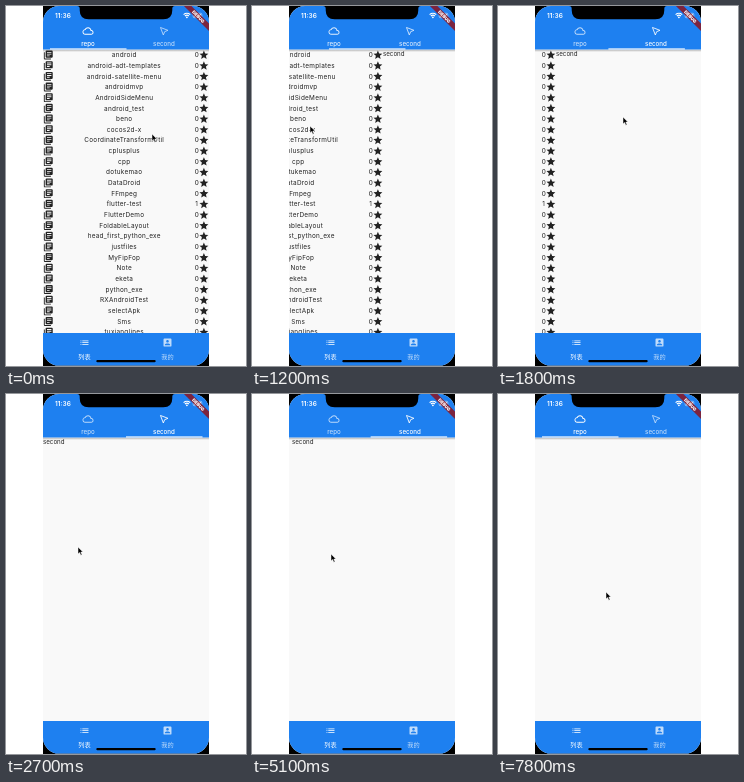
Write an HTML page that moves like this. It is 240 by 360 pixels and loops after 8000 ms.

```html
<!DOCTYPE html>
<html lang="en">
<head>
<meta charset="utf-8">
<title>Tab swipe</title>
<style>
  html, body { margin: 0; width: 100%; height: 100%; overflow: hidden; background: #fff; }
  svg { display: block; width: 100vw; height: 100vh; }
  text { font-family: Inter, Roboto, "Noto Sans CJK SC", "Noto Sans CJK", sans-serif; }
  .row text { font-size: 6.4px; letter-spacing: .27px; fill: #222; }
  .tab text { font-size: 6.2px; font-weight: 500; }
  .nav text { font: 500 6.2px "Noto Sans CJK SC", "Noto Sans CJK", sans-serif; }
  .mid { text-anchor: middle; }
  .white { fill: #fff; }
</style>
</head>
<body>
<svg viewBox="0 0 240 360">
  <defs>
    <clipPath id="screen"><rect x="37" width="166" height="359.6" rx="16"/></clipPath>
    <clipPath id="body"><rect x="37" y="43.5" width="166" height="283.5"/></clipPath>
    <linearGradient id="shade" x2="0" y2="1">
      <stop stop-color="#000" stop-opacity=".3"/>
      <stop offset="1" stop-color="#000" stop-opacity="0"/>
    </linearGradient>
    <path id="books" d="M4 6H2v14c0 1.1.9 2 2 2h14v-2H4V6zm16-4H8c-1.1 0-2 .9-2 2v12c0 1.1.9 2 2 2h12c1.1 0 2-.9 2-2V4c0-1.1-.9-2-2-2zm-1 9H9V9h10v2zm-4 4H9v-2h6v2zm4-8H9V5h10v2z"/>
    <path id="star" d="M12 17.27L18.18 21l-1.64-7.03L22 9.24l-7.19-.61L12 2 9.19 8.63 2 9.24l5.46 4.73L5.82 21z"/>
    <path id="cloud" d="M19.35 10.04C18.67 6.59 15.64 4 12 4 9.11 4 6.6 5.64 5.35 8.04 2.34 8.36 0 10.91 0 14c0 3.31 2.69 6 6 6h13c2.76 0 5-2.24 5-5 0-2.64-2.05-4.78-4.65-4.96zM19 18H6c-2.21 0-4-1.79-4-4s1.79-4 4-4h.71C7.37 7.69 9.48 6 12 6c3.04 0 5.5 2.46 5.5 5.5v.5H19c1.66 0 3 1.34 3 3s-1.34 3-3 3z"/>
    <path id="plane" d="M4 4L21 10.5 13.5 13.5 10.5 21z" fill="none" stroke="#fff" stroke-width="2"/>
    <path id="list" d="M3 13h2v-2H3v2zm0 4h2v-2H3v2zm0-8h2V7H3v2zm4 4h14v-2H7v2zm0 4h14v-2H7v2zM7 7v2h14V7H7z"/>
    <path id="account" d="M3 5v14c0 1.1.89 2 2 2h14c1.1 0 2-.9 2-2V5c0-1.1-.9-2-2-2H5c-1.11 0-2 .9-2 2zm12 4c0 1.66-1.34 3-3 3s-3-1.34-3-3 1.34-3 3-3 3 1.34 3 3zm-9 8c0-2 4-3.1 6-3.1s6 1.1 6 3.1v1H6v-1z"/>
  </defs>

  <rect x="37" width="166" height="360"/>
  <g clip-path="url(#screen)">
    <rect x="37" width="166" height="360" fill="#f9f9f9"/>
    <g clip-path="url(#body)">
      <g id="pages">
        <g id="rows"></g>
        <text x="203" y="49.8" font-size="6.2" fill="#222">second</text>
      </g>
      <rect x="37" y="43.5" width="166" height="2.5" fill="url(#shade)"/>
    </g>

    <rect x="37" width="166" height="43.5" fill="#1e80f0"/>
    <g class="tab white" id="tab0"></g>
    <g class="tab white" id="tab1"></g>
    <rect id="line" x="44" y="42.4" width="76.5" height="1.1" fill="#fff"/>

    <text class="white" x="49" y="11.9" font-size="6.5" font-weight="600">11:36</text>
    <g fill="none" stroke="#fff">
      <path d="M177.6 8.7a4.9 4.9 0 0 1 6.6 0M178.9 10a3 3 0 0 1 4 0" stroke-width="1.1"/>
      <rect x="187.2" y="7.3" width="8.6" height="4.4" rx="1.2" stroke-width=".5"/>
    </g>
    <circle class="white" cx="180.9" cy="11.3" r=".9"/>
    <rect class="white" x="188" y="8.1" width="7" height="2.8" rx=".6"/>
    <g transform="translate(203 0) rotate(45)">
      <rect x="-18" y="12.4" width="36" height="5.3" fill="#851d30" fill-opacity=".92"/>
      <text class="mid white" y="16.7" font-size="4.5" font-weight="900">DEBUG</text>
    </g>

    <g class="nav white">
      <rect x="37" y="327" width="166" height="33" fill="#1e80f0"/>
      <g id="nav0"></g>
      <g id="nav1" opacity=".72"></g>
    </g>
    <rect x="90.3" y="354" width="59.4" height="2.3" rx="1.15"/>
  </g>
  <path d="M71 0q2.7 0 2.7 2.7v1.6q0 9 9 9h74.6q9 0 9-9v-1.6q0-2.7 2.7-2.7z"/>
  <path id="cursor" d="M0 0v6.9l1.6-1.4 1.2 2.7 1.2-.5-1.2-2.6h2.1z" stroke="#fff" stroke-width=".5"/>
</svg>
<script>
const LOOP = 8000, STEP = 300, WIDTH = 166, PITCH = 10.66;
const repos = `android android-adt-templates android-satellite-menu androidmvp
  AndroidSideMenu android_test beno cocos2d-x CoordinateTransformUtil cplusplus cpp
  dotukemao DataDroid FFmpeg flutter-test FlutterDemo FoldableLayout
  head_first_python_exe justfiles MyFipFop Note eketa python_exe RXAndroidTest
  selectApk Sms tuxianglines`.split(/\s+/);

// [time, value] points, joined by straight lines
const scroll = [[0, 0], [300, 0], [1200, 72], [1800, 145], [2100, 162], [2400, 166],
  [4500, 166], [5100, 163], [6600, 74], [7200, 18], [7500, 0]];
const cursorX = [[0, 146], [300, 138], [1200, 58], [1800, 125], [2700, 72],
  [4500, 72], [5100, 79], [6600, 200], [7800, 108]];
const cursorY = [[0, 128], [1200, 120], [1800, 111], [2700, 153], [5100, 160],
  [6600, 162], [7800, 198]];

const $ = id => document.getElementById(id);
const icon = (id, cx, cy, size) =>
  `<use href="#${id}" transform="translate(${cx - size / 2} ${cy - size / 2}) scale(${size / 24})"/>`;
const label = (text, x, y) => `<text class="mid" x="${x}" y="${y}">${text}</text>`;

function at(points, t) {
  const i = points.findIndex(p => p[0] > t);
  if (i < 0) return points[points.length - 1][1];
  const [t0, a] = points[i - 1], [t1, b] = points[i];
  return a + (b - a) * (t - t0) / (t1 - t0);
}

$('rows').innerHTML = repos.map((name, i) => {
  const y = 49 + i * PITCH;
  return `<g class="row" fill="#222">${icon('books', 42.3, y, 10.64)}
    ${label(name, 118.2, y + 2.2)}${label(name === 'flutter-test' ? 1 : 0, 190.8, y + 2.2)}
    ${icon('star', 197.9, y, 10.64)}</g>`;
}).join('');
$('tab0').innerHTML = icon('cloud', 82, 25, 11) + label('repo', 82, 40.4);
$('tab1').innerHTML = icon('plane', 158, 25, 10.64) + label('second', 158, 40.4);
$('nav0').innerHTML = icon('list', 78.5, 336.6, 10.64) + label('列表', 78.5, 353);
$('nav1').innerHTML = icon('account', 161.5, 336.6, 10.64) + label('我的', 161.5, 353);

function draw(now) {
  const t = Math.floor(now % LOOP / STEP) * STEP;
  const x = at(scroll, t), part = x / WIDTH;
  $('pages').setAttribute('transform', `translate(${-x} 0)`);
  $('rows').style.display = t < 2400 ? '' : 'none';
  $('line').setAttribute('x', 44 + 76 * part);
  $('tab0').setAttribute('opacity', 1 - .3 * part);
  $('tab1').setAttribute('opacity', .7 + .3 * part);
  $('cursor').setAttribute('transform', `translate(${at(cursorX, t)} ${at(cursorY, t)})`);
}

const start = performance.now();
function tick() {
  draw(performance.now() - start);
  requestAnimationFrame(tick);
}
tick();
</script>
</body>
</html>
```
